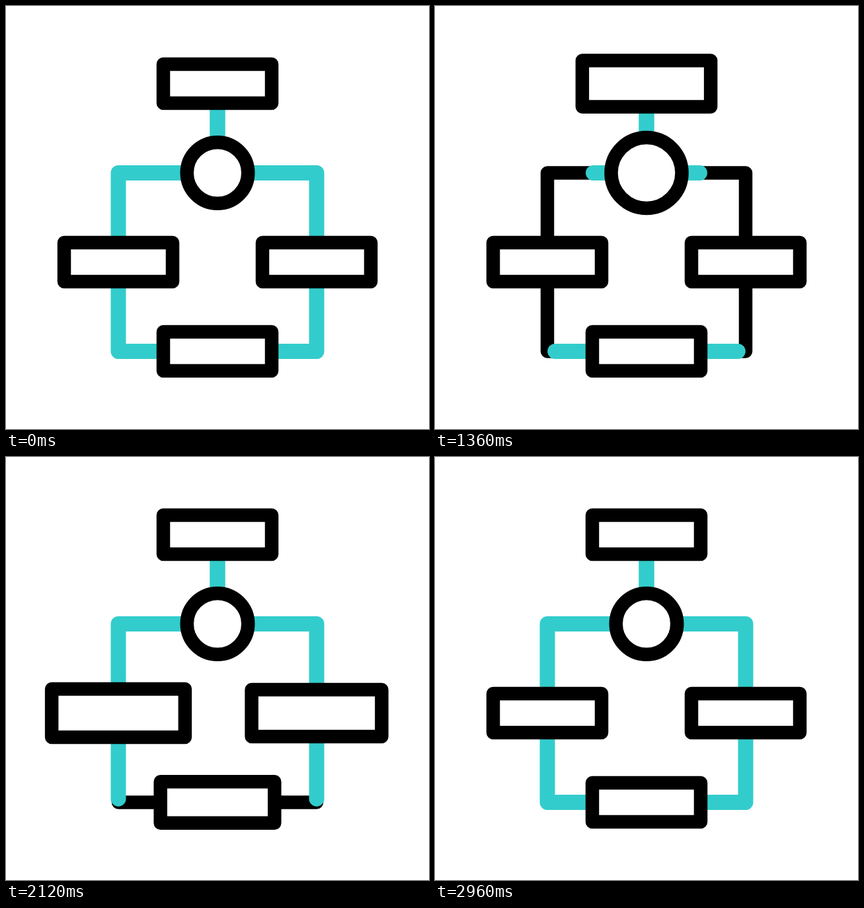
These frames come from a looping animation (640 by 640 pixels, 3000 ms). An HTML page with a canvas:

```html
<!DOCTYPE html>
<html lang="en">
<head>
<meta charset="utf-8">
<title>Flow diagram</title>
<style>
  html, body { margin: 0; width: 100%; height: 100%; overflow: hidden; background: #fff; }
  canvas { display: block; width: 640px; height: 640px; }
</style>
</head>
<body>
<canvas id="stage" width="640" height="640"></canvas>
<script>
const ctx = document.getElementById('stage').getContext('2d');
const LOOP = 3000;
const BLACK = '#000', TEAL = '#33cccc';
const LINE = 20.5, FLOW = 23;
const PULSE = 400;
const PATH_LENGTH = 705;

const boxes = [
  { x: 320, y: 117.5, peak: 0.30, grow: 684, shrink: 1192 },
  { x: 170, y: 387.5, peak: 0.23, grow: 1633, shrink: 2192 },
  { x: 470, y: 387.5, peak: 0.20, grow: 1633, shrink: 2192 },
  { x: 320, y: 522.5, peak: 0.15, grow: 1962, shrink: 2498 }
];
const hub = { x: 320, y: 252.5, peak: 0.20, grow: 1080, shrink: 1578 };

const clamp = v => Math.min(1, Math.max(0, v));
const smooth = u => u * u * (3 - 2 * u);

// Symmetric cubic-bezier(k, 0, 1 - k, 1), solved by bisection.
function ease(x, k) {
  if (x <= 0 || x >= 1) return clamp(x);
  let lo = 0, hi = 1;
  for (let i = 0; i < 24; i++) {
    const u = (lo + hi) / 2, v = 1 - u;
    if (3 * k * u * v * v + 3 * (1 - k) * u * u * v + u * u * u < x) lo = u;
    else hi = u;
  }
  return smooth(lo);
}

function scaleAt(part, t) {
  const up = smooth(clamp((t - part.grow) / PULSE));
  const down = smooth(clamp((t - part.shrink) / PULSE));
  return 1 + part.peak * (up - down);
}

// Strokes the part of both mirrored branches between two distances.
function strokeBranches(from, to, color, width) {
  if (to - from < 0.01) return;
  ctx.strokeStyle = color;
  ctx.lineWidth = width;
  ctx.setLineDash([to - from, 2 * PATH_LENGTH]);
  ctx.lineDashOffset = -from;
  for (const side of [-1, 1]) {
    const x = 320 + 150 * side;
    ctx.beginPath();
    ctx.moveTo(320, 117.5);
    ctx.lineTo(320, 252.5);
    ctx.lineTo(x, 252.5);
    ctx.lineTo(x, 522.5);
    ctx.lineTo(320, 522.5);
    ctx.stroke();
  }
  ctx.setLineDash([]);
}

function outline() {
  ctx.fillStyle = '#fff';
  ctx.strokeStyle = BLACK;
  ctx.lineWidth = LINE;
  ctx.fill();
  ctx.stroke();
}

function draw(t) {
  ctx.fillStyle = '#fff';
  ctx.fillRect(0, 0, 640, 640);
  ctx.lineCap = ctx.lineJoin = 'round';

  const tail = PATH_LENGTH * ease((t - 13) / 1930, 0.4);
  const head = PATH_LENGTH * ease((t - 629) / 2080, 0.25);
  strokeBranches(0, PATH_LENGTH, BLACK, LINE);
  strokeBranches(tail, PATH_LENGTH, TEAL, FLOW);
  strokeBranches(0, head, TEAL, FLOW);

  for (const box of boxes) {
    const s = scaleAt(box, t), w = 82 * s, h = 29.6 * s;
    ctx.beginPath();
    ctx.rect(box.x - w, box.y - h, 2 * w, 2 * h);
    outline();
  }
  ctx.beginPath();
  ctx.arc(hub.x, hub.y, 46.25 * scaleAt(hub, t), 0, 2 * Math.PI);
  outline();
}

const start = performance.now();
function tick() {
  draw((performance.now() - start) % LOOP);
  requestAnimationFrame(tick);
}
tick();
</script>
</body>
</html>
```
